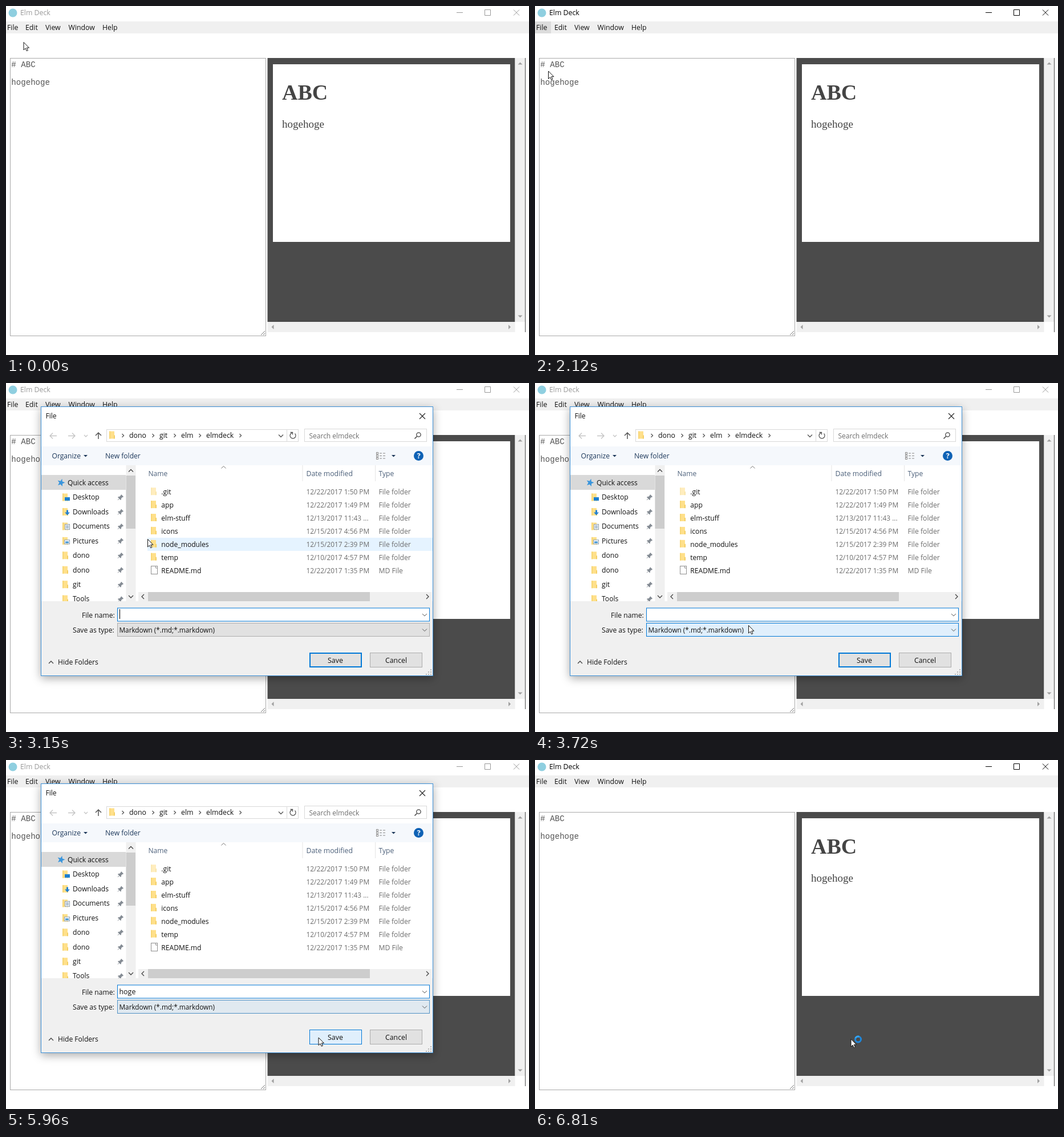
An HTML page that plays this animation: 917x611 px, repeating every 7900 ms.

```html
<!DOCTYPE html>
<html lang="en">
<head>
<meta charset="utf-8">
<title>Elm Deck</title>
<style>
html, body { margin: 0; width: 100%; height: 100%; overflow: hidden; background: #fff; }
svg { display: block; width: 917px; height: 611px; }
text { font: 12.1px "Open Sans", "Noto Sans", sans-serif; white-space: pre; }
.mono { font-family: "Liberation Mono", monospace; }
.serif { font-family: "Liberation Serif", serif; }
.bold { font-weight: 700; }
</style>
</head>
<body>
<svg id="stage" viewBox="0 0 917 611" xmlns="http://www.w3.org/2000/svg"></svg>
<script>
const LOOP = 7900;
const BLUE = '#0078d7';

// Markup helpers
const rect = (x, y, w, h, fill, extra = '') =>
  `<rect x="${x}" y="${y}" width="${w}" height="${h}" fill="${fill}" ${extra}/>`;
const box = (x, y, w, h, fill, stroke, extra = '') =>
  rect(x + .5, y + .5, w - 1, h - 1, fill, `stroke="${stroke}" ${extra}`);
const text = (x, y, str, fill = '#111', size = 12.1, extra = '') =>
  `<text x="${x}" y="${y}" fill="${fill}" style="font-size:${size}px" ${extra}>${str}</text>`;
const line = (d, stroke = '#444', width = 1, extra = '') =>
  `<path d="${d}" fill="none" stroke="${stroke}" stroke-width="${width}" ${extra}/>`;
const shape = (d, fill) => `<path d="${d}" fill="${fill}"/>`;
const group = (id, ...parts) => `<g id="${id}">${parts.join('')}</g>`;
const chevron = (x, y, dir, stroke = '#444', s = 4, width = 1.3) =>
  line(`M${-s} ${s / 2}L0 ${-s / 2}L${s} ${s / 2}`, stroke, width,
    `transform="translate(${x} ${y}) rotate(${{ up: 0, right: 90, down: 180, left: 270 }[dir]})"`);
const triangle = (x, y, angle, fill, s = 4) =>
  `<path d="M${-s} ${s / 2}L0 ${-s / 2}L${s} ${s / 2}Z" fill="${fill}" transform="translate(${x} ${y}) rotate(${angle})"/>`;
const cross = (x, y, stroke, s = 5) =>
  line(`M${x - s} ${y - s}l${2 * s} ${2 * s}m0 ${-2 * s}l${-2 * s} ${2 * s}`, stroke, 1.1);
const folder = (x, y, fade = 1) =>
  `<g opacity="${fade}">${rect(x, y, 9, 13, '#ffe08a')}${rect(x + 8, y + 7, 2, 6, '#f3cf66')}${rect(x, y, 2, 13, '#f7d677')}</g>`;
const star = (x, y) => {
  const pts = Array.from({ length: 10 }, (_, i) => {
    const r = i % 2 ? 3 : 7, a = i * Math.PI / 5 - 1.3;
    return `${(x + r * Math.cos(a)).toFixed(1)},${(y + r * Math.sin(a)).toFixed(1)}`;
  });
  return `<polygon points="${pts.join(' ')}" fill="#3a95dc"/>`;
};
const pin = (x, y) =>
  shape(`M${x + 1} ${y - 5}l4 4l-1 1l-1 0l-2 2l0 2l-1 1l-5 -5l1 -1l2 0l2 -2z`, '#858c94') +
  line(`M${x - 2} ${y + 2}l-3 3`, '#858c94');

// Main window
function appWindow() {
  const menus = [[2, 'File'], [34, 'Edit'], [69, 'View'], [109.5, 'Window'], [169, 'Help']];
  return rect(0, 0, 917, 611, '#fff') +
    '<circle cx="12" cy="12" r="7.5" fill="#8fcfe0"/>' +
    group('caption',
      text(25, 16.3, 'Elm Deck', 'currentColor', 12.3),
      line('M790 11.5h11M839.5 6.5h10v10h-10zM890 6.5l10 10m0 -10l-10 10', 'currentColor')) +
    rect(0, 27, 917, 21, '#f0f0f0') +
    rect(0, 27, 28, 21, '#dcdcdc', 'id="fileHot"') +
    menus.map(([x, s]) => text(x, 42.3, s, '#111', 12.3)).join('') +
    box(7, 91, 449, 487, '#fff', '#a9a9a9') +
    line('M447 576l7 -7M451 576l3 -3', '#777') +
    text(9.3, 106.5, '# ABC', '#555', 14.1, 'class="mono"') +
    text(9.3, 138.3, 'hogehoge', '#555', 14.1, 'class="mono"') +
    rect(458.5, 91, 434, 462, '#4b4b4b') +
    rect(468, 102, 416, 311, '#fff') +
    text(484, 163.5, 'ABC', '#444', 38, 'class="serif bold"') +
    text(484, 213, 'hogehoge', '#444', 19, 'class="serif"') +
    rect(892.5, 91, 17.5, 462, '#f0f0f0') + rect(458.5, 553, 434, 18, '#f0f0f0') +
    rect(910, 91, 1, 480, '#4b4b4b') +
    triangle(901.5, 100.5, 0, '#a0a0a0') + triangle(901.5, 543.5, 180, '#a0a0a0') +
    triangle(467.5, 562, 270, '#a0a0a0') + triangle(883, 562, 90, '#a0a0a0');
}

function fileMenu() {
  return group('menu',
    box(0, 48, 96, 81, '#f2f2f2', '#cccccc', 'filter="url(#menuShadow)"'),
    rect(3, 51, 90, 25, '#91c9f7', 'id="menuHot"'),
    ...['New', 'Open', 'Save'].map((s, i) => text(28, 68 + 25 * i, s)));
}

// Save dialog, in the order it is painted on screen
function dialogBase() {
  return box(61, 41, 688, 472, '#fff', '#3a8fd6', 'filter="url(#shadow)"') +
    text(69.5, 62.3, 'File') + cross(730, 58, '#222') +
    [[249.5, 'Name'], [526.5, 'Date modified', 12.3], [653.5, 'Type']]
      .map(([x, s, z]) => text(x, 162.8, s, '#4c607a', z)).join('') +
    rect(519.5, 144, 1, 28, '#e5e5e5') + rect(647, 144, 1, 28, '#e5e5e5') +
    chevron(381.5, 147.5, 'up', '#777', 4, 1) +
    rect(232, 366, 515, 16, '#f0f0f0') + rect(249, 366, 389, 16, '#cdcdcd') +
    chevron(240, 374, 'left') + chevron(739, 374, 'right');
}

function dialogLoading() {
  return group('loading',
    star(96.5, 167), text(108, 170.5, 'Quick access'),
    rect(62, 451, 686, 61, '#f0f0f0'), rect(71, 476, 105, 22, '#fff'),
    rect(531, 470, 93, 28, '#fafafa'), rect(637, 470, 93, 28, '#fafafa'),
    rect(729, 493, 18, 18, '#fafafa'));
}

function places() {
  const names = ['Desktop', 'Downloads', 'Documents', 'Pictures', 'dono', 'dono', 'git', 'Tools'];
  const badges = [
    y => rect(103, y, 9, 6, '#1c7fd0'),
    y => shape(`M106 ${y - 3}h3v4h3l-4.5 5l-4.5 -5h3z`, '#2580cf'),
    y => box(103, y - 4, 9, 10, '#fff', '#8a9aa8') + line(`M105 ${y - 1}h5m-5 2h5m-5 2h5`, '#6b8cab'),
    y => box(102, y - 2, 10, 8, '#fff', '#8a9aa8') + rect(104, y + 1, 6, 3, '#3f93d2')
  ];
  return names.map((s, i) => {
    const y = 200 + 25.45 * i;
    return folder(99, y - 6.5) + (badges[i] ? badges[i](y) : '') + text(117, y + 4.3, s) + pin(201, y);
  }).join('');
}

function dialogFull() {
  const edge = '#d9d9d9', pale = '#c4c4c4';
  return group('full',
    line('M89 92.5h-12m5 -5l-5 5l5 5M109 92.5h12m-5 -5l5 5l-5 5', pale, 1.3),
    chevron(140, 92.5, 'down', pale, 3), line('M162 98v-11m-5 5l5 -5l5 5', '#555', 1.5),
    box(176, 81, 337, 22, '#fff', edge), rect(492, 81, 1, 22, edge),
    chevron(482, 92.5, 'down', '#555'),
    line('M506.5 88.5a5 5 0 1 1 -5 -1.2M498.5 86.5h4v4', '#555', 1.3),
    box(523, 80, 215, 23, '#fff', edge),
    '<circle cx="723.5" cy="90.5" r="3.7" fill="none" stroke="#444" stroke-width="1.3"/>',
    line('M720.5 93.5l-4 4', '#444', 1.6),
    rect(62, 111, 686, 33, '#f5f8fc'),
    rect(62, 161, 148, 26, '#d9d9d9'), star(96.5, 174.5), text(108, 178.8, 'Quick access'),
    places(),
    rect(210.5, 144, 17, 238, '#f0f0f0'), rect(210.5, 162, 16.5, 93, '#cdcdcd'),
    chevron(219, 153.5, 'up'), chevron(219, 374, 'down'),
    rect(62, 382, 686, 130, '#f0f0f0'),
    text(133, 410.5, 'File name:'), text(117, 437.3, 'Save as type:'),
    box(195, 393.5, 548, 24, '#fff', BLUE), chevron(734, 406, 'down', '#555', 4, 1),
    box(195, 420, 548, 24, '#e1e1e1', '#adadad', 'id="combo"'), chevron(734, 432.5, 'down', '#555', 4, 1),
    text(198.5, 437.3, 'Markdown (*.md;*.markdown)', '#111', 11.75),
    text(198.5, 410.3, '', '#111', 12.4, 'id="typed"'),
    rect(199, 396, 1, 17, '#000', 'id="caret"'),
    chevron(79, 489, 'up'), text(91, 493, 'Hide Folders'),
    box(532, 472, 92, 26, BLUE, BLUE), rect(534, 474, 88, 22, '#e1e1e1', 'id="saveFace"'),
    box(532, 472, 92, 26, '#e0effc', BLUE, 'id="saveHot"'),
    text(564, 489.5, 'Save', '#111', 12.4),
    box(638, 472, 92, 26, '#e1e1e1', '#adadad'), text(665, 489.5, 'Cancel', '#111', 12.3),
    [[744, 502], [744, 506], [740, 506], [744, 510], [740, 510], [736, 510]]
      .map(([x, y]) => rect(x, y - 1, 2, 2, '#b5b5b5')).join(''));
}

function dialogFiles() {
  const files = [
    ['.git', '12/22/2017 1:50 PM'], ['app', '12/22/2017 1:49 PM'], ['elm-stuff', '12/13/2017 11:43 ...'],
    ['icons', '12/15/2017 4:56 PM'], ['node_modules', '12/15/2017 2:39 PM'],
    ['temp', '12/10/2017 4:57 PM'], ['README.md', '12/22/2017 1:35 PM']
  ];
  const path = [[216, 'dono', 205], [269, 'git', 258], [307, 'elm', 296], [351, 'elmdeck', 340]];
  return group('files',
    folder(181, 84.5),
    ...path.map(([x, s, cx]) => text(x, 96.3, s, '#111', 12.3) + chevron(cx, 92, 'right', '#555', 3)),
    chevron(411, 92, 'right', '#555', 3),
    text(531.5, 96.5, 'Search elmdeck', '#6d6d6d', 12),
    text(80.5, 132.3, 'Organize', '#1e395b'), triangle(139.5, 127.7, 180, '#1e395b', 3.5),
    text(174, 132.3, 'New folder', '#1e395b'),
    ...[123, 127.5, 132].map(y => box(649, y - 2, 4, 4, '#fff', '#8a8a8a') + line(`M655 ${y}h4m2 0h4`, '#888')),
    triangle(679.5, 127.7, 180, '#1e395b', 3.5),
    '<circle cx="723.5" cy="127.5" r="8.5" fill="#0f62b5"/>',
    text(720.7, 132, '?', '#fff', 12.5, 'class="bold"'),
    rect(248, 270.5, 500, 23, '#e5f3ff', 'id="rowHot"'),
    ...files.map(([name, date], i) => {
      const y = 190.7 + 22.9 * i, last = i === 6;
      const icon = last
        ? box(254, 320, 12, 15, '#fff', '#8f8f8f') + line('M262.5 320.5v3.5h3.5', '#8f8f8f')
        : folder(254, y - 7.5, i ? 1 : .55);
      return icon + text(272.3, y + 4.5, name) + text(526.5, y + 4.5, date, '#6d6d6d', 11.9) +
        text(653.5, y + 4.5, last ? 'MD File' : 'File folder', '#6d6d6d', 12.2);
    }));
}

function pointer() {
  const ring = (id, x, y, r, w) => group(id,
    `<circle cx="${x}" cy="${y}" r="${r}" fill="none" stroke="#1e88dd" stroke-width="${w}"/>`,
    `<g transform="translate(${x} ${y})"><path class="spin" d="M0 ${-r}A${r} ${r} 0 0 1 ${r} 0" fill="none" stroke="#35a5f2" stroke-width="${w}"/></g>`);
  return group('cursor',
    `<path id="arrow" d="M.5 .5V14L3.6 11.1L5.7 15.7L7.9 14.7L5.8 10.2H10Z" fill="#fff" stroke="#111" stroke-width="1"/>`,
    ring('wait', 0, 0, 6.5, 4), ring('busy', 13, 1, 5, 3));
}

const stage = document.getElementById('stage');
stage.innerHTML = `<defs>
  <filter id="shadow" x="-10%" y="-10%" width="120%" height="120%"><feDropShadow dx="0" dy="4" stdDeviation="8" flood-opacity=".34"/></filter>
  <filter id="menuShadow" x="-10%" y="-10%" width="120%" height="125%"><feDropShadow dx="2" dy="2" stdDeviation="1" flood-opacity=".35"/></filter>
</defs>` + appWindow() + fileMenu() +
  group('dialog', dialogBase(), dialogLoading(), dialogFull(), dialogFiles(),
    text(448, 201, 'Working on it...', '#6d6d6d', 12, 'id="working"')) +
  pointer();

const el = {};
stage.querySelectorAll('[id]').forEach(n => el[n.id] = n);
const spins = stage.querySelectorAll('.spin');

// Timing helpers
const clamp = v => Math.max(0, Math.min(1, v));
const stepAt = (t, a, b, n) =>
  t < a ? 0 : Math.min(n, Math.floor((t - a) / (b - a) * (n - 1) + 1e-6) + 1);
const show = (node, on) => node.setAttribute('visibility', on ? 'inherit' : 'hidden');
const mix = (a, b, p) => `rgb(${a.map((v, i) => Math.round(v + (b[i] - v) * p))})`;

// Pointer moves: start, end, steps, target x, target y
const moves = [
  [70, 390, 5, 14, 38], [850, 1250, 6, 20, 82], [1340, 1720, 6, 23, 113.5],
  [2440, 2690, 4, 135, 156], [2750, 2920, 3, 168, 184], [3070, 3150, 2, 248, 273],
  [3230, 3720, 7, 374, 424], [5320, 5960, 9, 547.5, 485.5], [6020, 6100, 2, 553.5, 488]
];
function pointerAt(t) {
  let x = 30.5, y = 63;
  for (const [a, b, n, tx, ty] of moves) {
    const p = stepAt(t, a, b, n) / n;
    x += (tx - x) * p;
    y += (ty - y) * p;
  }
  return [x, y];
}

const keyTimes = [3950, 4080, 4160, 4320];

function render(t) {
  const [x, y] = pointerAt(t);
  const opening = stepAt(t, 2440, 2920, 7), closing = stepAt(t, 6190, 6810, 9);

  const active = (t >= 540 && t < 2440) || closing >= 3;
  el.caption.setAttribute('color', active ? '#000' : '#999');
  show(el.fileHot, t >= 540 && t < 2190);

  show(el.menu, t >= 620 && t < 2120);
  el.menu.setAttribute('opacity', clamp((t - 580) / 200));
  const item = Math.floor((y - 51) / 25);
  show(el.menuHot, item >= 0 && t < 2120 && t >= 850);
  el.menuHot.setAttribute('y', 51 + 25 * item);

  const appear = clamp((opening - 1) * .218), vanish = clamp((closing - 2) * .22);
  const alpha = appear * (1 - vanish), scale = .955 + .045 * alpha;
  show(el.dialog, alpha > 0);
  el.dialog.setAttribute('opacity', alpha);
  el.dialog.setAttribute('transform', `translate(405 277) scale(${scale}) translate(-405 -277)`);
  const painted = opening >= 6, listed = t >= 3070;
  show(el.loading, !painted && alpha > 0);
  show(el.full, painted && alpha > 0);
  show(el.files, listed && alpha > 0);
  show(el.working, !listed && alpha > 0);

  const row = Math.floor((y - 179.3) / 22.9);
  show(el.rowHot, listed && alpha > 0 && x > 235 && row >= 0 && row < 7);
  el.rowHot.setAttribute('y', 179.3 + 22.9 * row);

  const cool = t < 3720 ? 1 : clamp((t - 5500) / 1000);
  el.combo.setAttribute('fill', mix([224, 239, 252], [225, 225, 225], cool));
  el.combo.setAttribute('stroke', mix([0, 120, 215], [173, 173, 173], cool));
  show(el.saveHot, alpha > 0 && x > 532 && y > 472);
  el.saveHot.setAttribute('fill', closing ? '#cce4f7' : '#e0effc');

  el.typed.textContent = 'hoge'.slice(0, keyTimes.filter(k => t >= k).length);
  const typing = t >= 3950 && t < 4320;
  const blink = t - (t < 3950 ? 2920 : 4320);
  show(el.caret, painted && alpha > 0 && (typing || Math.floor(blink / 535) % 2 === 0));
  el.caret.setAttribute('x', Math.floor(199 + el.typed.getComputedTextLength()));

  const waiting = t >= 2600 && t < 3070, visible = t < 3950 || t >= 5320;
  show(el.cursor, visible);
  el.cursor.setAttribute('transform', `translate(${x} ${y})`);
  show(el.arrow, visible && !waiting);
  show(el.wait, waiting);
  show(el.busy, closing >= 2);
  const turn = Math.min(t, 6810) * .36;
  spins.forEach(s => s.setAttribute('transform', `rotate(${turn})`));
}

const start = performance.now();
function tick() {
  render((performance.now() - start) % LOOP);
  requestAnimationFrame(tick);
}
tick();
</script>
</body>
</html>
```
